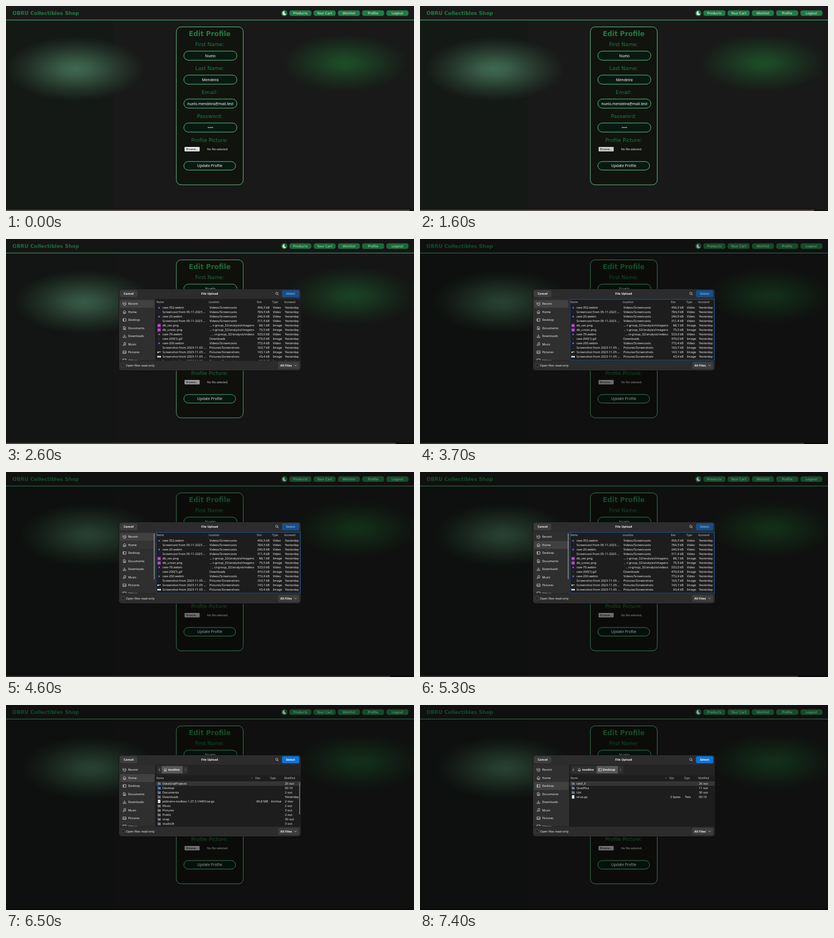
Recreate the animation shown at these times as an HTML page. Size 730x368 px, loop 8000 ms.

```html
<!DOCTYPE html>
<html lang="en">
<head>
<meta charset="utf-8">
<title>Edit Profile</title>
<style>
  html, body { margin: 0; width: 100%; height: 100%; overflow: hidden; background: #181918; }
  svg { display: block; width: 730px; height: 368px; }
  text { font-family: "Noto Sans", sans-serif; font-size: 5.45px; fill: #ededed; white-space: pre; }
  .deja { font-family: "DejaVu Sans", sans-serif; }
  .b { font-weight: 700; }
  .m { text-anchor: middle; }
  .e { text-anchor: end; }
  .head { font-size: 4.4px; font-weight: 700; fill: #929292; }
  .line { fill: none; stroke: #d8d8d8; stroke-width: .75; }
</style>
</head>
<body>
<svg id="stage" viewBox="0 0 730 368" xmlns="http://www.w3.org/2000/svg"></svg>
<script>
const GREEN = '#207b42', MINT = '#58bd80';
const LOOP = 8000, STEP = 100;

const rect = (x, y, w, h, fill, rx = 0, more = '') =>
  `<rect x="${x}" y="${y}" width="${w}" height="${h}" fill="${fill}" rx="${rx}" ${more}/>`;
// y is the vertical middle of lower-case letters
const text = (x, y, s, cls = '', size = 5.45, fill = '') =>
  `<text x="${x}" y="${y + size * .36}" class="${cls}" style="${cls.includes('head') ? '' : `font-size:${size}px;`}${fill ? `fill:${fill}` : ''}">${s}</text>`;
const path = (d, more = '') => `<path class="line" d="${d}" ${more}/>`;
const group = (id, body, more = '') => `<g id="${id}" ${more}>${body}</g>`;

const stops = (color, list) => list.map(([at, o]) =>
  `<stop offset="${at}" stop-color="${color}" stop-opacity="${o}"/>`).join('');
const falloff = [[0, 1], [.2, .86], [.45, .56], [.7, .27], [.9, .08], [1, 0]];

const defs = `<defs>
  <radialGradient id="gl">${stops('#406850', falloff)}</radialGradient>
  <radialGradient id="gr">${stops('#1e4c28', falloff)}</radialGradient>
  <clipPath id="side"><rect x="203" y="108" width="64" height="110"/></clipPath>
  <clipPath id="list"><rect x="267" y="107" width="261" height="111"/></clipPath>
</defs>`;

function navBar() {
  const items = [['Products', 507], ['Your Cart', 550.4], ['Wishlist', 593.8], ['Profile', 637.2], ['Logout', 680.6]];
  return rect(0, 0, 730, 25, '#191919') + rect(0, 24.6, 730, 1.2, '#4c9e6c') +
    text(11.5, 13, 'OBRU Collectibles Shop', 'deja b', 9, GREEN) +
    `<circle cx="498" cy="12.8" r="5.5" fill="${GREEN}"/>` +
    '<path d="M498.6 9.4A3.5 3.5 0 1 0 501.4 14.4A3.2 3.2 0 0 1 498.6 9.4Z" fill="#fff"/>' +
    items.map(([s, x]) => rect(x, 7.8, 39.5, 10, GREEN, 4) + text(x + 19.7, 12.7, s, 'deja m', 6, '#e4f3e9')).join('');
}

function form() {
  const pill = (y, s, w = 95, h = 16.3) =>
    rect(318.2, y, w, h, '#071a12', 8.1, `stroke="${MINT}" stroke-width="1"`) +
    text(318.2 + w / 2, y + h / 2, s, 'm', 6.67, '#fff');
  const fields = [['First Name:', 'Nuelo'], ['Last Name:', 'Mendeira'],
    ['Email:', 'nuelo.mendeira@mail.test'], ['Password:', '••••']];
  return rect(304.8, 37.5, 119.6, 283.5, '#11130e', 8.5, 'stroke="#62b886" stroke-width="1"') +
    text(364.5, 50, 'Edit Profile', 'deja b m', 12, GREEN) +
    fields.map(([label, value], i) =>
      text(364.5, 69 + 43 * i, label, 'deja m', 9.1, GREEN) + pill(81 + 43 * i, value)).join('') +
    text(364.3, 241, 'Profile Picture:', 'deja m', 9.1, GREEN) +
    rect(319.5, 253, 27, 8, '#e9e9ed', 1, 'id="browse"') +
    text(333, 257, 'Browse...', 'm', 5, '#111') +
    text(360, 257, 'No file selected.', '', 5) +
    pill(279.2, 'Update Profile', 92.6, 15.3);
}

const icon = {
  clock: 'M212 113.8a2.7 2.7 0 1 1-2.4 1.6M212 115v1.6l1.2 .8M209 113.6l.4 2 2-.2',
  home: 'M209 131.2l3-2.9 3 2.9M210 130.8v3h1.4v-1.7h1.2v1.7h1.4v-3',
  desk: 'M209.3 143h5.4v4.6h-5.4zM210.4 143v4.6',
  doc: 'M210 157.2h2.7l1.4 1.4v4h-4.1zM211 160h2M211 161.3h2',
  down: 'M212 171.5v3.6M210.4 173.7l1.6 1.6 1.6-1.6M209.4 175.2v1.7h5.2v-1.7',
  note: 'M211 190.6v-4.2l3-.6v4.1M211 190.6a.8 .8 0 1 1-.8-.8M214 189.9a.8 .8 0 1 1-.8-.8',
  pic: 'M209.2 201h5.6v4.4h-5.6zM209.4 205l1.8-2 1.3 1.2 .9-.8 1.4 1.4',
  film: 'M209.2 215.4h5.6v4.4h-5.6z'
};

function sidebar() {
  const names = ['Recent', 'Home', 'Desktop', 'Documents', 'Downloads', 'Music', 'Pictures', 'Videos'];
  const body = names.map((s, i) => text(218.4, 116.5 + 14.45 * i, s)).join('') +
    Object.values(icon).map(d => path(d)).join('');
  return rect(203, 107.5, 64, 110.5, '#2f2f2f') +
    group('', rect(204, 109.4, 61.5, 14.2, '#414141', 2, 'id="place"') +
      rect(204, 123.9, 61.5, 14.2, '#414141', 2, 'id="hover"') + body, 'clip-path="url(#side)"') +
    rect(264.6, 110, 1.2, 82.5, '#a2a2a2', .6, 'id="sideBar"') +
    rect(267, 107.5, .8, 110.5, '#161616');
}

function fileIcon(kind, y) {
  const box = (x, dy, w, h, c) => rect(x, y + dy, w, h, c, .5);
  switch (kind) {
    case 'v': return box(271.3, -2.6, 5.2, 5.2, '#28204a') + `<circle cx="274" cy="${y}" r="1" fill="#b6a8d8"/>`;
    case 's': return box(271.3, -.4, 5, .8, '#2b2b33');
    case 'p': return box(271, -2.8, 5.8, 5.8, '#a63bb4') + box(272.2, -.6, 3.4, 1, '#d58fe0');
    case 'g': return box(273, -.6, 1.2, 1, '#bbb');
    case 'w': return box(271, -1.3, 2.2, 2.6, '#eee') + box(273.8, -1.3, 3, 1.4, '#ccc');
    case 'x': return box(270.8, -1.4, 2.8, 3, '#eee') + box(274.2, -1.4, 2.8, 3, '#eee');
    case 'a': return box(271.8, -3, 4.4, 6, '#f0f0f0') + box(273.6, -1.6, 1, 2.6, '#b9a98a');
    case 't': return box(271.8, -3, 4.4, 6, '#f0f0f0') + box(272.8, -.8, 2.4, .6, '#999');
  }
  const c = kind === 'd' ? '#2274d0' : '#5d6873';
  return box(271.2, -2.7, 2.6, 2, c) + box(271.2, -2.1, 5.8, 4.8, c) +
    box(272.6, -.5, 3, 1.8, kind === 'd' ? '#4b96e6' : '#8a949e');
}

function recentList() {
  const cast = 'Videos/Screencasts', shot = 'Pictures/Screenshots';
  const rows = [
    ['v', 'cwe-352.webm', cast, '456,3 kB'], ['s', 'Screencast from 05-11-2023 …', cast, '784,3 kB'],
    ['v', 'cwe-20.webm', cast, '240,9 kB'], ['s', 'Screencast from 05-11-2023 …', cast, '311,4 kB'],
    ['p', 'db_sec.png', '… t-group_32/analysis/imagens', '88,1 kB'],
    ['p', 'db_unsec.png', '… t-group_32/analysis/imagens', '75,5 kB'],
    ['v', 'cwe-79.webm', '… ct-group_32/analysis/videos', '533,0 kB'],
    ['g', 'cwe-200(1).gif', 'Downloads', '470,0 kB'], ['v', 'cwe-200.webm', cast, '772,4 kB'],
    ['s', 'Screenshot from 2023-11-05 …', shot, '163,7 kB'],
    ['w', 'Screenshot from 2023-11-05 …', shot, '143,1 kB'],
    ['x', 'Screenshot from 2023-11-05 …', shot, '43,4 kB'],
    ['s', 'Screenshot from 2023-11-05 …', shot, '58,2 kB']];
  const heads = [['Name', 269.3], ['Location', 362.6], ['Size', 448.8], ['Type', 476.6], ['Accessed', 497.8]];
  return heads.map(([s, x]) => text(x, 113, s, 'head', 4.4)).join('') +
    rows.map(([k, name, where, size], i) => {
      const y = 123.4 + 7.98 * i;
      const type = 'vs'.includes(k) && i < 9 ? 'Video' : 'Image';
      const place = where[0] === '…' ? text(444, y, where, 'e') : text(364, y, where);
      return fileIcon(k, y) + text(280, y, name) + place + text(471.5, y, size, 'e') +
        text(477.5, y, type) + text(499, y, 'Yesterday');
    }).join('') +
    rect(268.2, 108.2, 258.4, 109.2, 'none', 0, 'id="focus" stroke="#235c99" stroke-width="1"');
}

const houseAt = x => path(`M${x} 116.2l2.6-2.5 2.6 2.5M${x + .9} 116v2.7h1.2v-1.5h1v1.5h1.2v-2.7`);

function folder(inDesktop, rows) {
  const heads = [['Name', 269.3], ['Size', 446], ['Type', 472.6], ['Modified', 497.8]];
  const next = inDesktop ? 358 : 320;
  return rect(268, 107.5, 259.4, 19, '#242424') +
    rect(270.5, 109.5, inDesktop ? 93 : 55, 13.4, '#303030', 2) +
    (inDesktop ? rect(316, 109.5, 38, 13.4, '#575757') : rect(278.6, 109.5, 37.4, 13.4, '#575757')) +
    path('M275.3 114.2l-1.8 2 1.8 2') + path(`M${next} 114.2l1.8 2-1.8 2`, 'opacity=".5"') +
    houseAt(282.4) + text(290, 116.2, 'teodino', 'b') +
    (inDesktop ? path('M319.6 114h5v4.4h-5zM320.8 114v4.4') + text(326.8, 116.2, 'Desktop', 'b') : '') +
    heads.map(([s, x]) => text(x, 131, s, 'head', 4.4)).join('') +
    path('M438.6 131.7l1.5-1.5 1.5 1.5', 'opacity=".6"') +
    rect(268, 137, 259.4, 8, '#353535', 0, inDesktop ? '' : 'id="picked"') +
    rows.map(([k, name, date, size, type], i) => {
      const y = 141 + 8.02 * i;
      return fileIcon(k, y) + text(280, y, name) + text(499, y, date) +
        (size ? text(448, y, size) + text(474, y, type) : '');
    }).join('') +
    (inDesktop ? '' : rect(524.8, 139.5, 1.2, 57, '#8a8a8a', .6));
}

const homeRows = [['f', 'DataGripProjects', '25 out'], ['d', 'Desktop', '00:19'], ['f', 'Documents', '2 out'],
  ['f', 'Downloads', 'Yesterday'], ['a', 'jetbrains-toolbox-1.27.3.14493.tar.gz', '2 mar', '69,8 MB', 'Archive'],
  ['f', 'Music', '2 out'], ['f', 'Pictures', '3 out'], ['f', 'Public', '2 out'], ['f', 'snap', '30 out'],
  ['f', 'studio3t', '3 out']];
const deskRows = [['f', 'lab3_3', '26 out'], ['f', 'Qualifica', '11 out'], ['f', 'Uni', '30 out'],
  ['t', 'virus.py', '00:19', '0 bytes', 'Text']];

function dialog() {
  return rect(201, 89.3, 327.4, 148, '#000', 6, 'opacity=".35"') +
    rect(202, 90, 325.6, 146, '#2c2c2c', 5) +
    rect(204, 92, 31, 12.6, '#3d3d3d', 2.5) + text(219.4, 98.2, 'Cancel', 'b m') +
    text(364.4, 98.2, 'File Upload', 'b m') +
    '<circle class="line" cx="484.5" cy="97.6" r="2"/>' + path('M486 99.1l1.8 1.8') +
    rect(493.8, 92, 30.8, 12.6, '#174f8c', 2.5, 'id="select"') +
    text(509.2, 98.2, '<tspan id="selectText">Select</tspan>', 'b m') +
    rect(267, 107.5, 260.6, 110.5, '#1d1d1d') + sidebar() +
    group('', group('recent', recentList()) + group('home', folder(false, homeRows)) +
      group('desk', folder(true, deskRows)), 'clip-path="url(#list)"') +
    rect(202, 217.8, 325.6, .6, '#1a1a1a') +
    rect(206, 223.6, 6.2, 6.2, '#262626', 1.4, 'stroke="#555" stroke-width=".7"') +
    text(214.4, 226.8, 'Open files read-only') +
    rect(487, 220.5, 37.6, 12.8, '#3d3d3d', 2.5) + text(490.8, 226.8, 'All Files', 'b') +
    path('M516.2 226l1.8 1.8 1.8-1.8');
}

document.getElementById('stage').innerHTML = defs +
  rect(0, 0, 730, 368, '#181918') + rect(0, 25, 193, 343, '#151916') +
  '<ellipse id="glowL" cy="113" rx="126" ry="58" fill="url(#gl)"/>' +
  '<ellipse id="glowR" cy="102" rx="117" ry="53" fill="url(#gr)"/>' +
  navBar() + form() +
  rect(0, 365.8, 730, 2.2, '#120d0e') + rect(0, 366, 722, 1.6, '#6c6260', 0, 'id="bar"') +
  rect(0, 0, 730, 368, '#000', 0, 'id="shade"') + group('dialog', dialog());

const part = {};
document.querySelectorAll('[id]').forEach(n => { if (n.id) part[n.id] = n; });
const set = (id, name, value) => part[id].setAttribute(name, value);
const show = (id, on) => set(id, 'opacity', +on);

const hold = (t, keys) => keys.reduce((v, [at, to]) => t >= at ? to : v, keys[0][1]);
function blend(t, keys) {
  const i = keys.findIndex(k => k[0] > t);
  if (i < 0) return keys[keys.length - 1][1];
  if (i === 0) return keys[0][1];
  const [a, va] = keys[i - 1], [b, vb] = keys[i];
  return va + (vb - va) * (t - a) / (b - a);
}

const barWidth = [[0, 722], [500, 713], [1500, 705], [2200, 697], [3400, 687], [5100, 676], [6500, 0]];
const leftX = [[1000, 125], [1600, 134], [2400, 138], [3100, 144], [3700, 147], [5100, 148], [5900, 152]];
const rightX = [[1000, 606], [1600, 613], [2400, 617], [3100, 623], [3700, 626], [5100, 628], [5900, 633]];
const dim = [[2300, 0], [3100, .38]];
const browseFill = [[0, '#e9e9ed'], [1000, '#d0d0d4'], [2100, '#b1b1b6']];

function draw(t) {
  set('bar', 'width', hold(t, barWidth));
  set('glowL', 'cx', blend(t, leftX));
  set('glowR', 'cx', blend(t, rightX));
  set('browse', 'fill', hold(t, browseFill));
  show('shade', blend(t, dim));
  show('dialog', blend(t, [[2300, 0], [2500, 1]]));
  show('focus', t >= 3400);
  show('sideBar', t >= 4300 && t < 5500);
  show('hover', t < 4900 ? blend(t, [[4500, 0], [4700, .6]]) : 0);
  set('place', 'y', hold(t, [[0, 109.4], [4900, 123.9], [7000, 138.3]]));
  show('recent', t < 5500);
  show('home', t >= 5500 && t < 7000);
  show('desk', t >= 7000);
  show('picked', blend(t, [[5900, 0], [6300, 1]]));
  set('select', 'fill', t < 5500 ? '#174f8c' : '#0b74e0');
  part.selectText.style.fill = t < 5500 ? '#86a5c8' : '#fff';
}

const start = performance.now();
function tick() {
  const t = (performance.now() - start) % LOOP;
  draw(Math.floor(t / STEP) * STEP);
  requestAnimationFrame(tick);
}
tick();
</script>
</body>
</html>
```
